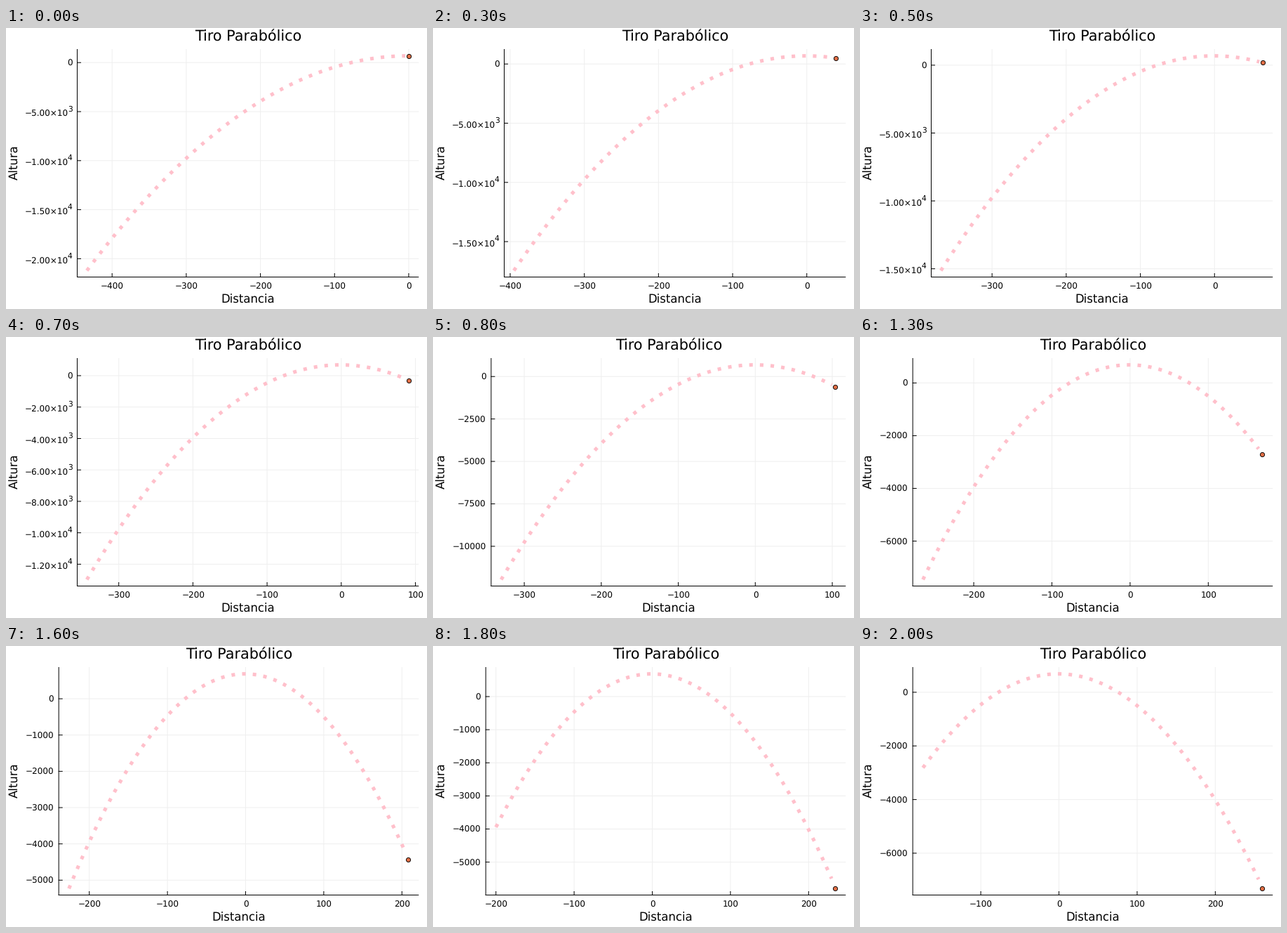
A matplotlib script for the animation above (2.1 s loop, 600 px wide and 400 px high).

```python
import math
import numpy as np
import matplotlib.pyplot as plt
from matplotlib.animation import FuncAnimation

W, H, DPI = 600, 400, 100
FRAMES, INTERVAL = 21, 100
TOP, BOTTOM, RIGHT = 30.5, 354.5, 587.7
STEP = 13        # horizontal advance of the ball per frame
TAIL, GAP = 434, 4.6   # dashed path spans from TAIL to GAP behind the ball
NICE = {1: 1.0, 5: 0.9, 2: 0.7, 2.5: 0.5, 3: 0.2}

plt.rcParams["font.family"] = "DejaVu Sans"
plt.rcParams["text.hinting"] = "none"
fig = plt.figure(figsize=(W / DPI, H / DPI), dpi=DPI, facecolor="white")
ax = fig.add_axes([0, 0, 1, 1])


def pt(px):
    return px * 72 / DPI


def path_y(x):
    return 686 - 0.1167 * (x + 0.8) ** 2


def ball_y(t):
    return 680 - 20 * t * t


def padded(lo, hi):
    pad = 0.03 * (hi - lo)
    return lo - pad, hi + pad


def pick_ticks(lo, hi):
    """Score round steps by count, coverage and niceness; keep the best."""
    best, key = None, None
    power = math.floor(math.log10(hi - lo))
    for p in (power - 1, power):
        for q, nice in NICE.items():
            step = q * 10 ** p
            first, last = math.ceil(lo / step), math.floor(hi / step)
            n = last - first + 1
            if not 4 <= n <= 8:
                continue
            cover = (hi - lo) / ((n - 1) * step)
            score = 0.25 * (1 - abs(n - 5) / 5) + 0.5 * cover + 0.25 * nice
            rank = (round(score, 6), -n)
            if key is None or rank > key:
                best, key = np.arange(first, last + 1) * step, rank
    return best


def text(x, y, s, size, ha="center", **kw):
    ax.text(x, y, s.replace("-", "\u2212"), fontsize=pt(size), ha=ha,
            va=kw.pop("va", "baseline"), color="black", **kw)


def line(xs, ys, color="black", width=1.0, **kw):
    ax.plot(xs, ys, color=color, lw=pt(width), snap=False, **kw)


def y_label(right, y, value, sci):
    if not sci or value == 0:
        text(right, y + 4.8, f"{value:.0f}", 12, "right")
        return
    e = math.floor(math.log10(abs(value)))
    text(right - 6.0, y + 7.3, f"{value / 10 ** e:.2f}\u00d710", 12, "right")
    text(right + 0.2, y - 0.6, str(e), 10.6, "right")


def draw(t):
    ax.clear()
    ax.set(xlim=(0, W), ylim=(H, 0))
    ax.axis("off")

    bx, by = STEP * t, ball_y(t)
    xs = np.linspace(bx - TAIL, bx - GAP, 400)
    ys = path_y(xs)
    x0, x1 = padded(bx - TAIL, bx)
    y0, y1 = padded(min(ys.min(), by), max(ys.max(), by))
    xticks, yticks = pick_ticks(x0, x1), pick_ticks(y0, y1)

    span = yticks[-1] - yticks[0]
    sci = span > 10000
    left = 101.5 if sci else 75.2 + 7.65 * (len(f"{span:.0f}") - 4)

    def px(x):
        return left + (x - x0) / (x1 - x0) * (RIGHT - left)

    def py(y):
        return BOTTOM - (y - y0) / (y1 - y0) * (BOTTOM - TOP)

    for x in px(xticks):
        line([x, x], [TOP, BOTTOM], "#efefef")
    for y in py(yticks):
        line([left, RIGHT], [y, y], "#efefef")

    line([left, left], [TOP, BOTTOM], solid_capstyle="projecting")
    line([left, RIGHT], [BOTTOM, BOTTOM], solid_capstyle="projecting")
    for v in xticks:
        line([px(v)] * 2, [BOTTOM, BOTTOM - 5])
        text(px(v) + 0.4, 371.5, f"{v:.0f}", 12)
    for v in yticks:
        line([left, left + 5], [py(v)] * 2)
        y_label(left - 7.1, py(v), v, sci)

    line(px(xs), py(ys), "pink", 5.06, linestyle=(0, (1, 2)),
         dash_capstyle="butt")
    ax.plot(px(bx), py(by), "o", ms=pt(6.2), mfc="#e26f46", mec="black",
            mew=pt(0.9), snap=False)

    mid = (left + RIGHT) / 2 + 0.5
    text(mid, 18.6, "Tiro Parab\u00f3lico", 20.8)
    text(mid, 392, "Distancia", 16.5)
    text(21, (TOP + BOTTOM) / 2 - 1.3, "Altura", 16.5, rotation=90,
         va="center", ha="right")
    return []


anim = FuncAnimation(fig, draw, frames=FRAMES, interval=INTERVAL, repeat=True,
                     repeat_delay=0, init_func=lambda: draw(0))
plt.show()
```
